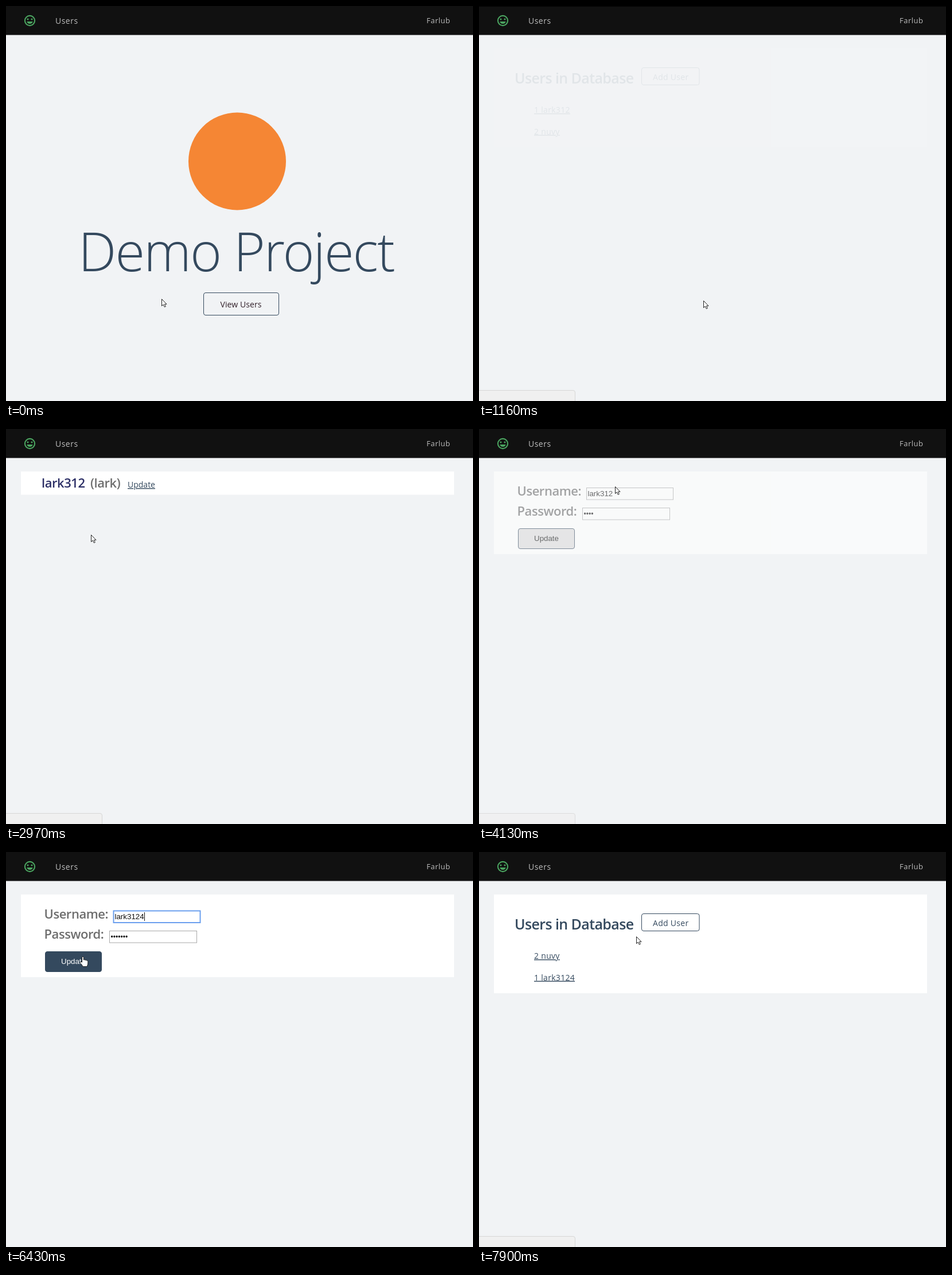
Animation of 814x688 px, one loop 8000 ms. Source, as an HTML page:

```html
<!DOCTYPE html>
<html lang="en">
<head>
<meta charset="utf-8">
<title>Demo Project</title>
<style>
  html, body { margin: 0; width: 100%; height: 100%; overflow: hidden; background: #f1f3f5; }
  svg { display: block; width: 814px; height: 688px; font: 14px 'Open Sans', 'Noto Sans', sans-serif; fill: #34495e; }
  .nav { fill: #bdbdbd; letter-spacing: .5px; }
  .title { font-size: 94px; font-weight: 300; letter-spacing: -1.95px; }
  .heading { font-size: 25px; font-weight: 600; letter-spacing: -.6px; }
  .label { font-size: 22px; font-weight: 600; letter-spacing: -.45px; fill: #6e6e6e; }
  .spaced { letter-spacing: .3px; }
  .link { text-decoration: underline; }
  .link.hover { fill: #5460c4; }
  .button rect { fill: none; stroke: #34495e; }
  .button.hover rect { fill: #34495e; }
  .button.hover text { fill: #fff; }
  #update rect { fill: #ddd; }
  #update.hover rect { fill: #34495e; }
  .field { fill: #fff; stroke: #a9a9a9; }
  .field.focus { stroke: #6b9fee; stroke-width: 2; }
  .input { font: 13.33px 'Liberation Sans', Arial, sans-serif; fill: #111; }
  .card { fill: #fff; }
</style>
</head>
<body>
<svg viewBox="0 0 814 688">
  <rect width="814" height="688" fill="#f1f3f5"/>
  <rect width="814" height="50.5" fill="#111"/>
  <rect id="progress" height="1" fill="#000"/>
  <g fill="#4aa35f">
    <circle cx="41.5" cy="25.5" r="8.6" fill="none" stroke="#4aa35f" stroke-width="2.1"/>
    <circle cx="38" cy="23" r="1.5"/>
    <circle cx="45" cy="23" r="1.5"/>
    <path d="M36.3 27H46.7A5.4 5.4 0 0 1 36.3 27Z"/>
  </g>
  <text class="nav" x="86" y="30.5">Users</text>
  <text class="nav" x="733" y="30" font-size="13">Farlub</text>

  <g id="home">
    <circle cx="403" cy="270.5" r="85" fill="#f58634"/>
    <text class="title" x="126" y="462">Demo Project</text>
    <g id="view" class="button">
      <rect x="344.5" y="499.5" width="131" height="39" rx="3.5"/>
      <text x="373.5" y="525" fill="#32202a" letter-spacing=".1">View Users</text>
    </g>
  </g>

  <g id="list">
    <rect class="card" x="26" y="74" width="755" height="172"/>
    <text class="heading" x="62" y="135">Users in Database</text>
    <g class="button">
      <rect x="283.5" y="107.5" width="100.5" height="30" rx="3.5"/>
      <text class="spaced" x="303" y="128.5">Add User</text>
    </g>
    <text id="first" class="link spaced" x="96" y="186"></text>
    <text id="second" class="link spaced" x="96" y="223.5"></text>
  </g>

  <g id="user">
    <rect class="card" x="26" y="74" width="755" height="40.5"/>
    <text class="label" x="62" y="102" style="fill:#2c2f66">lark312</text>
    <text class="label" x="147" y="102">(lark)</text>
    <text id="edit" class="link" x="212" y="102">Update</text>
  </g>

  <g id="form">
    <rect class="card" x="26" y="74" width="755" height="144"/>
    <text class="label" x="66.5" y="116">Username:</text>
    <text class="label" x="66.5" y="151">Password:</text>
    <rect id="nameField" class="field" x="187.5" y="102.5" width="151" height="20.5"/>
    <rect id="passField" class="field" x="180.5" y="137.5" width="152" height="20.5"/>
    <text id="name" class="input" x="189.5" y="116.5"></text>
    <text id="pass" class="input" x="182.5" y="151.5" style="font-size:12.2px"></text>
    <rect id="caret" width="1" height="15" fill="#111"/>
    <g id="update" class="button">
      <rect x="68.5" y="173.5" width="98" height="35" rx="3.5"/>
      <text class="input" x="117.5" y="194.5" text-anchor="middle" style="fill:">Update</text>
    </g>
  </g>

  <path id="status" d="M-1 669.5H164Q167.5 669.5 167.5 673V690H-1Z" fill="#f0f0f0" stroke="#d6d6d6"/>

  <g id="pointer" fill="#fff" stroke="#222" stroke-linejoin="round">
    <path id="arrow" d="M.5 .5V12.5L3.2 10 5.3 14.3 7.3 13.4 5.3 9.3H9Z"/>
    <path id="hand" d="M-1.5 10V1.2Q0-.8 1.3 1.2V6Q2.8 4.6 4 6.3 5.5 5.4 6.6 7 8.6 6.4 8.8 8.5V12Q8.6 15 7 17.5H0Q-1.5 14.5-4.3 11.5-5.2 9.6-3.2 9.2Z"/>
    <path id="beam" fill="none" d="M-3-6H-1L0-5 1-6H3M0-5V5M-3 6H-1L0 5 1 6H3"/>
  </g>
</svg>
<script>
const $ = id => document.getElementById(id);
const clamp = v => Math.max(0, Math.min(1, v));
const ramp = (t, a, b) => clamp((t - a) / (b - a));
const within = (t, ...spans) => spans.some(([a, b]) => t >= a && t < b);
const show = (id, opacity) => {
  $(id).style.opacity = opacity;
  $(id).style.display = opacity > 0 ? '' : 'none';
};
const hover = (id, on) => $(id).classList.toggle('hover', on);

// page: fade in from, to, fade out from, to
const pages = {
  home: [[-2, -1, 880, 1150]],
  list: [[1150, 1290, 2400, 2620], [6700, 6920, 9000, 9001]],
  user: [[2660, 2820, 3700, 3930]],
  form: [[4030, 4200, 6500, 6620]]
};
// time, x, y
const route = [
  [0, 271, 510], [180, 271, 510], [700, 391, 513], [1820, 391, 513],
  [2060, 212, 243], [2300, 148, 184], [3170, 148, 184], [3560, 236, 96],
  [4100, 236, 96], [4500, 250, 147], [5380, 250, 147], [5540, 269, 111],
  [6000, 269, 111], [6350, 134, 182], [7330, 134, 182], [7800, 274, 147], [8000, 274, 147]
];
const statusSpans = [[560, 1980, 2110], [2340, 3220, 3350], [3540, 4100, 4230], [7330, 9000, 9100]];
const loads = [[880, 1040, 1600], [2400, 2600, 2970], [6500, 6700, 7330]];

function position(t) {
  const i = route.findIndex(p => p[0] > t);
  const [t0, x0, y0] = route[i - 1], [t1, x1, y1] = route[i];
  const k = (t - t0) / (t1 - t0);
  return [x0 + (x1 - x0) * k, y0 + (y1 - y0) * k];
}

function drawForm(t) {
  const onName = t >= 5710, onPass = within(t, [4880, 5710]);
  $('name').textContent = t < 5900 ? 'lark312' : 'lark3124';
  $('pass').textContent = '•'.repeat(4 + Math.round(3 * ramp(t, 4980, 5300)));
  $('nameField').classList.toggle('focus', onName);
  $('passField').classList.toggle('focus', onPass);
  show('caret', +(onName || onPass));
  const input = $(onName ? 'name' : 'pass');
  $('caret').setAttribute('x', Math.round(+input.getAttribute('x') + input.getComputedTextLength()));
  $('caret').setAttribute('y', onName ? 105 : 140);
}

function draw() {
  const t = performance.now() % 8000;
  for (const id in pages) {
    show(id, Math.max(...pages[id].map(([a, b, c, d]) => ramp(t, a, b) * (1 - ramp(t, c, d)))));
  }
  const updated = t > 6600;
  $('first').textContent = updated ? '2 nuvy' : '1 lark312';
  $('second').textContent = updated ? '1 lark3124' : '2 nuvy';

  const onView = within(t, [500, 1150]);
  const onFirst = within(t, [2270, 2620], [6760, 7355]);
  const onEdit = within(t, [3480, 3930]);
  const onUpdate = within(t, [6270, 6620]);
  hover('view', onView);
  hover('first', onFirst);
  hover('edit', onEdit);
  hover('update', onUpdate);
  if (within(t, [4030, 6620])) drawForm(t);

  const hand = onView || onFirst || onEdit || onUpdate;
  const beam = within(t, [4440, 6090]);
  show('hand', +hand);
  show('beam', +beam);
  show('arrow', +!(hand || beam));
  $('pointer').setAttribute('transform', `translate(${position(t).map(Math.round)})`);

  show('status', Math.max(...statusSpans.map(([a, b, c]) => ramp(t, a, a + 80) * (1 - ramp(t, b, c)))));
  const load = loads.find(([a, , c]) => within(t, [a, c]));
  $('progress').setAttribute('width', load ? 814 * ramp(t, load[0], load[1]) : 0);
  requestAnimationFrame(draw);
}
draw();
</script>
</body>
</html>
```
